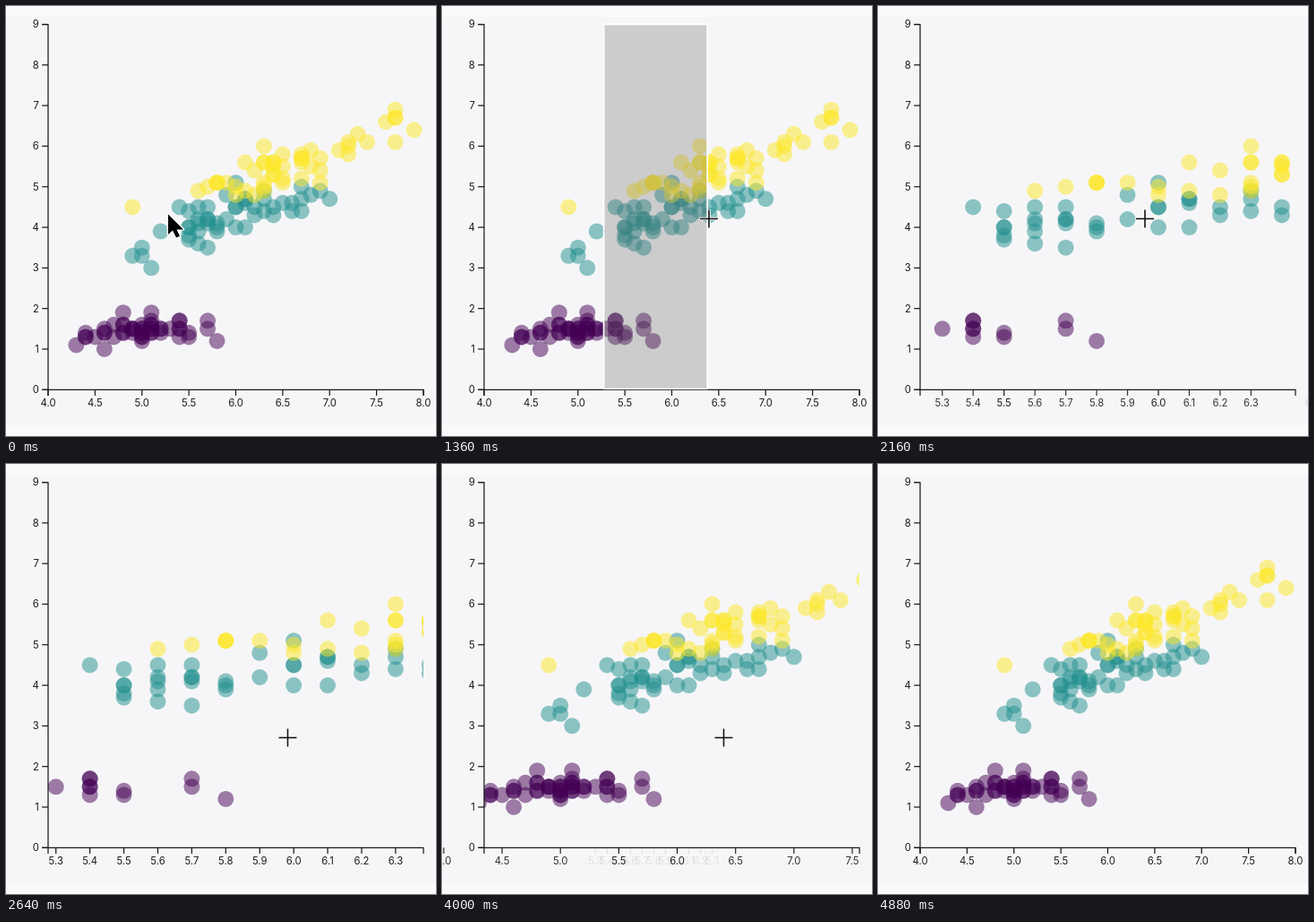
Animation, 480 px wide and 480 px high, one loop 5520 ms. Source, as an HTML page with a canvas:

```html
<!DOCTYPE html>
<html lang="en">
<head>
<meta charset="utf-8">
<title>Brush zoom scatter plot</title>
<style>
  html, body { margin: 0; width: 100%; height: 100%; overflow: hidden; background: #f6f6f8; }
  canvas { display: block; width: 480px; height: 480px; }
</style>
</head>
<body>
<canvas id="stage" width="480" height="480"></canvas>
<script>
const ctx = document.getElementById('stage').getContext('2d');
const LOOP = 5520, STEP = 80;
const LEFT = 47, RIGHT = 466, TOP = 20.5, BOTTOM = 428.3;
const INK = '#1c1c1c';
const FULL = [4, 8], ZOOM = [5.277, 6.382];
const ZOOM_IN = 1573, ZOOM_OUT = 3387, ZOOM_TIME = 858;

// n values spread evenly from a to b
const run = (a, b, n) =>
  Array.from({ length: n }, (_, i) => Math.round(a + (b - a) * i / (n - 1)));

// Each group: colour, first x, then the y values of each next column (tenths).
const groups = [
  { color: '#440154', first: 43, columns: [
    [11], [13, 13, 14], [13], [10, 14, 14, 15], [13, 16],
    [14, 14, 16, 16, 19], [14, 15, 15, 15], run(12, 16, 8),
    [...run(14, 16, 6), 17, 19], [14, 15, 15], [15],
    [13, 15, 15, 17, 17], [13, 14], [], [15, 17], [12]
  ] },
  { color: '#21908d', first: 49, columns: [
    [33], [33, 35], [30], [39], [], [45], [37, 38, 40, 40, 44],
    [36, 39, 41, 42, 45], [35, 41, 42, 42, 45], [39, 40, 41], [42, 48],
    [40, 45, 45, 51], [40, 46, 47, 47], [43, 45], [44, 47, 49], [43, 45],
    [46], [44, 46], [44, 47, 50], [48], [49], [47]
  ] },
  { color: '#fde725', first: 49, columns: [
    [45], [], [], [], [], [], [], [49], [50], [51, 51, 51], [51], [48, 50],
    [49, 56], [48, 54], [49, 50, 51, 56, 56, 60], [53, 53, 55, 56, 56],
    [51, 52, 55, 58], [], [52, 56, 57, 57, 58], [55, 59], [51, 54, 57], [],
    [59], [58, 60, 61], [63], [61], [], [66], [61, 67, 67, 69], [], [64]
  ] }
];

const clamp = u => Math.max(0, Math.min(1, u));
const mix = (a, b, u) => a + (b - a) * u;
const smooth = u => u * u * (3 - 2 * u);
const cubic = u => u < 0.5 ? 4 * u ** 3 : 1 - 4 * (1 - u) ** 3;
const progress = (t, start, time) => clamp((t - start) / time);

const scale = (v, [a, b]) => LEFT + (v - a) / (b - a) * (RIGHT - LEFT);
const xAt = (v, k) => mix(scale(v, FULL), scale(v, ZOOM), k);
const yAt = v => mix(BOTTOM, TOP, v / 9);

const zoomAt = t =>
  cubic(progress(t, ZOOM_IN, ZOOM_TIME)) - cubic(progress(t, ZOOM_OUT, ZOOM_TIME));

function line(points) {
  ctx.beginPath();
  points.forEach(([x, y]) => ctx.lineTo(x, y));
  ctx.stroke();
}

function drawBackground() {
  ctx.fillStyle = '#fafafa';
  ctx.fillRect(0, 0, 480, 480);
  ctx.fillStyle = '#f6f6f8';
  ctx.fillRect(0, 12, 480, 456);
}

function drawXTick(tenths, k, alpha) {
  const x = xAt(tenths / 10, k);
  ctx.globalAlpha = alpha;
  line([[x, BOTTOM], [x, BOTTOM + 6.8]]);
  ctx.fillText((tenths / 10).toFixed(1), x, BOTTOM + 18.2);
  ctx.globalAlpha = 1;
}

function drawAxes(k) {
  ctx.strokeStyle = ctx.fillStyle = INK;
  ctx.lineWidth = 1.25;
  ctx.font = '11.3px Inter, "Liberation Sans", sans-serif';
  line([[LEFT, BOTTOM + 6.8], [LEFT, BOTTOM], [RIGHT, BOTTOM], [RIGHT, BOTTOM + 6.8]]);
  line([[LEFT - 6.8, BOTTOM], [LEFT, BOTTOM], [LEFT, TOP], [LEFT - 6.8, TOP]]);

  ctx.textAlign = 'center';
  for (let v = 40; v <= 80; v += 5) {
    const shared = v === 55 || v === 60;
    if (shared || k < 1) drawXTick(v, k, shared ? 1 : 1 - k);
  }
  for (let v = 53; v <= 63; v++) {
    if (k > 0 && v % 5) drawXTick(v, k, k);
  }

  ctx.textAlign = 'right';
  for (let v = 0; v <= 9; v++) {
    const y = yAt(v);
    line([[LEFT - 6.8, y], [LEFT, y]]);
    ctx.fillText(v, LEFT - 10.2, y + 3.9);
  }
}

function drawPoints(k) {
  ctx.save();
  ctx.beginPath();
  ctx.rect(LEFT, TOP, RIGHT - LEFT, BOTTOM - TOP);
  ctx.clip();
  ctx.globalAlpha = 0.5;
  for (const { color, first, columns } of groups) {
    ctx.fillStyle = color;
    columns.forEach((values, i) => {
      const x = xAt((first + i) / 10, k);
      for (const v of values) {
        ctx.beginPath();
        ctx.arc(x, yAt(v / 10), 9, 0, Math.PI * 2);
        ctx.fill();
      }
    });
  }
  ctx.restore();
}

function cursorAt(t) {
  if (t < 720) return [181, 236];
  const drag = progress(t, 720, 640);
  const move = smooth(progress(t, 2400, 240));
  return [
    mix(189, 298, mix(drag, smooth(drag), 0.5)) + 16.5 * move,
    mix(236.5, 237.5, drag) + 68 * move
  ];
}

function drawBrush(t) {
  if (t < 800 || t >= 1600) return;
  const x = 180.6, w = cursorAt(t)[0] - 1.8 - x;
  ctx.globalAlpha = 0.3;
  ctx.fillStyle = '#6c6c6c';
  ctx.fillRect(x, TOP, w, BOTTOM - TOP - 1);
  ctx.globalAlpha = 1;
  ctx.strokeStyle = '#fff';
  ctx.lineWidth = 1.7;
  ctx.strokeRect(x, TOP, w, BOTTOM - TOP - 1);
}

function drawArrow(x, y) {
  ctx.save();
  ctx.translate(x, y);
  ctx.beginPath();
  [[0, 0], [0, 22.5], [5, 18], [9, 26], [13, 24.5], [9.5, 17], [17, 17]]
    .forEach(p => ctx.lineTo(...p));
  ctx.closePath();
  ctx.lineJoin = 'round';
  ctx.strokeStyle = '#fff';
  ctx.lineWidth = 2.6;
  ctx.stroke();
  ctx.fillStyle = '#000';
  ctx.fill();
  ctx.restore();
}

function drawCross([x, y]) {
  for (const [color, width, arm] of [['#fff', 3.4, 10.6], ['#111', 1.6, 10]]) {
    ctx.strokeStyle = color;
    ctx.lineWidth = width;
    line([[x - arm, y], [x + arm, y]]);
    line([[x, y - arm], [x, y + arm]]);
  }
}

function draw(t) {
  const k = zoomAt(t);
  drawBackground();
  drawPoints(k);
  drawAxes(k);
  drawBrush(t);
  if (t < 320) drawArrow(181, 232.5);
  else if (t < 4800) drawCross(cursorAt(t));
}

const start = performance.now();
function frame() {
  const t = (performance.now() - start) % LOOP;
  draw(Math.floor(t / STEP) * STEP);
  requestAnimationFrame(frame);
}
frame();
</script>
</body>
</html>
```
